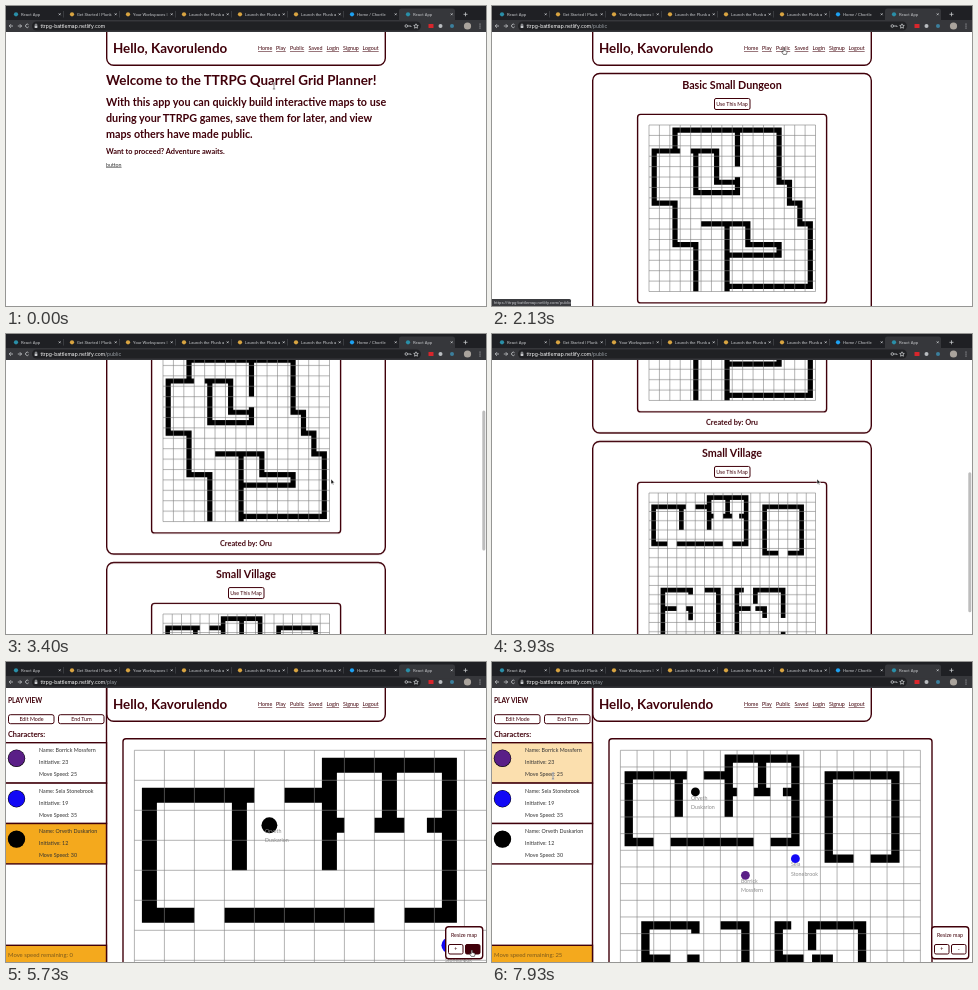
An HTML page for the animation above (8000 ms loop, 480x300 px).

```html
<!DOCTYPE html>
<html lang="en">
<head>
<meta charset="utf-8">
<title>Battle map</title>
<style>
@property --scroll { syntax: "<number>"; inherits: true; initial-value: 0; }
@property --cell { syntax: "<number>"; inherits: true; initial-value: 32.67; }
html, body { margin: 0; width: 100%; height: 100%; overflow: hidden; background: #fff; }
svg { display: block; width: 480px; height: 300px; font: 5.33px Lato, sans-serif; --ink: #40000a; }
text { fill: #333; white-space: pre; }
.ink { fill: var(--ink); }
.bold { fill: var(--ink); font-weight: 700; }
.h1 { font-size: 13.4px; }
.h2 { font-size: 10.75px; }
.h3 { font-size: 7.35px; }
.view { font-size: 6.6px; }
.speed { font-size: 5.9px; fill: #7d5a1c; }
.mid { text-anchor: middle; }
.light { fill: #fff; }
.link { text-decoration: underline; }
.label { fill: #8c8c8c; }
.box { fill: #fff; stroke: var(--ink); stroke-width: 1.4px; }
.thin { stroke-width: 1px; }
.wall { fill: none; stroke: #000; stroke-width: .5; }
.grid { fill: none; stroke: #808080; stroke-width: .6px; vector-effect: non-scaling-stroke; }
.ui { font-family: Roboto, sans-serif; font-size: 4.2px; fill: #c6c8cb; }
.url { font-family: Inter, sans-serif; font-size: 5px; fill: #fff; }
.dim { fill: #9aa0a6; }
.icon { fill: none; stroke: #c6c8cb; stroke-width: .8px; }
#public { transform: translateY(calc(var(--scroll) * -1px)); }
#thumb { transform: translateY(calc(var(--scroll) * .51px)); }
#board { width: calc(var(--cell) * 18px + 23px); height: calc(var(--cell) * 16px + 23px); }
#field { transform: scale(var(--cell)); }
.token { transform: translate(calc(var(--x) * var(--cell) * 1px), calc(var(--y) * var(--cell) * 1px)); }
.token circle { r: calc(var(--cell) * .265px); }
</style>
</head>
<body>
<svg id="stage" viewBox="0 0 480 300"></svg>
<script>
const LOOP = 8000, INK = '#40000a', ORANGE = '#f4a91d', PALE = '#fbdfae';

const text = (x, y, s, cls = '') => `<text x="${x}" y="${y}" class="${cls}">${s}</text>`;
const rect = (x, y, w, h, r = 0, attrs = 'class="box"') =>
  `<rect x="${x}" y="${y}" width="${w}" height="${h}" rx="${r}" ${attrs}/>`;
const dot = (x, y, r, color) => `<circle cx="${x}" cy="${y}" r="${r}" fill="${color}"/>`;
const icon = d => `<path d="${d}" class="icon"/>`;
const group = (id, body) => `<g id="${id}">${body}</g>`;
const shift = (x, y, body) => `<g transform="translate(${x} ${y})">${body}</g>`;

// Walls run through cell centres, in cell units.
const dungeon = {
  cols: 16, rows: 16,
  walls: 'M2.5 2H0V7H2V11H4V15.5M2 2V0H12V5H13V7H14V9H15V15H7M7 15.5V9M4.5 9H9V11H12V12H7' +
    'M3.5 2H6V5H8M8 4.5V6H4V2M8 0V3.5'
};
const village = {
  cols: 18, rows: 16,
  walls: 'M3.5 1H0V5H1.5M2.5 5H7.5M8.5 5H10V0H6V3.5M4.5 1H6M3 1V3.5M6 2H6.5M8 0V2M7.5 2H8.5M9.25 2H10' +
    'M13.5 6H12V1H16V6H14.5' +
    'M4.25 10H1V15H7V10H5.5M4 10V10.5M1 12H2.5M3.5 12H4.25M4 12V13.25' +
    'M9.75 10H9V15H14V14.5M10.75 10H14V13M11 10V11.5M9 12H10.5M11 12H12V13'
};

function drawMap({ cols, rows, walls }) {
  let lines = '';
  for (let i = 0; i <= cols; i++) lines += `M${i} 0V${rows}`;
  for (let j = 0; j <= rows; j++) lines += `M0 ${j}H${cols}`;
  return `<path class="wall" transform="translate(.5 .5)" d="${walls}"/><path class="grid" d="${lines}"/>`;
}

function header() {
  const links = { Home: 252, Play: 270, Public: 284, Saved: 302.5, Login: 320.5, Signup: 337, Logout: 356.5 };
  return rect(100.7, 10, 278.6, 49.3, 7) + text(107, 47, 'Hello, Kavorulendo', 'bold h1') +
    Object.entries(links).map(([name, x]) => text(x, 44, name, 'ink link')).join('');
}

function home() {
  return header() +
    text(100, 78.5, 'Welcome to the TTRPG Quarrel Grid Planner!', 'bold h1') +
    ['With this app you can quickly build interactive maps to use',
     'during your TTRPG games, save them for later, and view',
     'maps others have made public.'].map((s, i) => text(100, 99.7 + 16 * i, s, 'bold h2')).join('') +
    text(100, 148, 'Want to proceed? Adventure awaits.', 'bold h3') +
    text(100, 160.5, 'button', 'link');
}

function card(y, name, map, hoverId) {
  const cell = 166.5 / map.cols, h = cell * map.rows;
  const button = (attrs, cls) => rect(222.5, 25.5, 35.5, 11, 1.5, attrs) + text(240, 32.9, 'Use This Map', cls);
  return shift(0, y,
    rect(100.7, .5, 278.6, h + 84, 7) +
    text(240, 16.3, name, 'bold h2 mid') +
    button('class="box thin"', 'ink mid') +
    (hoverId ? group(hoverId, button('class="ink"', 'light mid')) : '') +
    rect(145.6, 41.4, 189, h + 22, 3) +
    `<g transform="translate(157 52) scale(${cell})">${drawMap(map)}</g>` +
    text(240, 52 + h + 24.6, 'Created by: Oru', 'bold h3 mid'));
}

const people = [
  { name: 'Borrick Mossfern', init: 23, speed: 25, color: '#5a1f87', x: 7.5, y: 7.5 },
  { name: 'Sela Stonebrook', init: 19, speed: 35, color: '#1208f5', x: 10.5, y: 6.5 },
  { name: 'Orveth Duskarion', init: 12, speed: 30, color: '#000', x: 4.5, y: 2.5 }
];

function sidebar() {
  const rows = people.map((p, i) => shift(0, 80.7 + 40.4 * i,
    rect(-2, 0, 102.5, 40.4, 0, `id="row${i}" class="box"`) +
    dot(10.5, 15.6, 8.7, '#000') + dot(10.5, 15.6, 8.2, p.color) +
    text(33, 9.8, 'Name: ' + p.name) + text(33, 21.8, 'Initiative: ' + p.init) +
    text(33, 33.8, 'Move Speed: ' + p.speed))).join('');
  const button = (x, s) => rect(x, 52.7, 45.5, 9, 2, 'class="box thin"') + text(x + 23, 59.2, s, 'ink mid');
  const left = n => text(2, 294.6, 'Move speed remaining: ' + n, 'speed');
  return rect(-2, 10, 102.5, 300) +
    text(2, 41, 'PLAY VIEW', 'bold view') +
    button(2.5, 'Edit Mode') + button(52.5, 'End Turn') +
    text(2, 75.2, 'Characters:', 'bold h3') + rows +
    rect(-2, 283.3, 102.5, 30, 0, `fill="${ORANGE}" stroke="${INK}" stroke-width="1.4"`) +
    group('spent', left(0)) + group('fresh', left(25));
}

function play() {
  const tokens = people.map(p => {
    const [first, last] = p.name.split(' ');
    return `<g class="token" style="--x:${p.x};--y:${p.y}"><circle fill="${p.color}"/>` +
      text(-4.5, 7.8, first, 'label') + text(-4.5, 17.2, last, 'label') + '</g>';
  }).join('');
  const battle = '<rect id="board" class="box" x="117" y="76.7" rx="3"/>' +
    shift(128.4, 88.3, group('field', drawMap(village)) + tokens);
  return group('battle', battle) + header() + sidebar() +
    rect(439.7, 264.7, 37, 32, 3) + text(458, 275.2, 'Resize map', 'ink mid') +
    rect(442.5, 282.5, 14.5, 9.5, 1.5, 'class="box thin"') + text(449.8, 289, '+', 'ink mid') +
    rect(459.5, 282.5, 14.5, 9.5, 1.5, 'id="minus" class="box thin"') + text(466.8, 289, '-', 'ink mid');
}

function chrome() {
  const tabs = ['React App', 'Get Started | Plunk', 'Your Workspaces |', 'Launch the Plunk a',
    'Launch the Plunk a', 'Launch the Plunk a', 'Home / Chortle', 'React App'];
  const tints = ['#2a8fa8', '#d9a441', '#d9a441', '#d9a441', '#d9a441', '#d9a441', '#1da1f2', '#2a8fa8'];
  const fill = c => `fill="${c}"`;
  const host = 'ttrpg-battlemap.netlify.com';
  const address = (id, path) => group(id, text(34.5, 21.9, `${host}<tspan class="dim">${path}</tspan>`, 'url'));
  return rect(0, 0, 480, 26, 0, fill('#36373b')) + rect(0, 0, 480, 14, 0, fill('#1f2024')) +
    rect(393, 2.5, 56, 14, 2.5, fill('#36373b')) +
    tabs.map((s, i) => shift(56 * i, 0,
      dot(10, 8.3, 2.1, tints[i]) + text(15, 9.8, s, 'ui') + icon('M52.8 7.4l1.8 1.8m0-1.8l-1.8 1.8') +
      (i < 6 ? rect(57, 5, .5, 6.5, 0, fill('#55575b')) : ''))).join('') +
    icon('M457.5 8.3h4M459.5 6.3v4') +
    rect(26, 15.5, 389, 9, 4.5, fill('#202124')) +
    icon('M7 20H3.2M5 18.2L3.2 20L5 21.8M11.8 20h3.8M13.8 18.2l1.8 1.8l-1.8 1.8M22.5 18.7a1.7 1.7 0 1 0 .2 2') +
    rect(28.6, 19.5, 2.8, 2.4, .3, fill('#c6c8cb')) + icon('M29.2 19.5v-.7a.8.8 0 0 1 1.6 0v.7') +
    address('urlHome', '') + address('urlPublic', '/public') + address('urlPlay', '/play') +
    icon('M402 20h3v1M399 20a1.2 1.2 0 1 0 2.6 0a1.2 1.2 0 1 0-2.6 0') +
    icon('M410 17.8l.7 1.5l1.6.2l-1.2 1.1l.3 1.6l-1.4-.8l-1.4.8l.3-1.6l-1.2-1.1l1.6-.2z') +
    rect(422.5, 18, 5, 4, .6, fill('#d8262c')) + dot(434.5, 20, 2, '#b9bcc0') + dot(446, 20, 2, '#3b7f9c') +
    dot(461.5, 20, 3.6, '#aaa49d') +
    [18, 20, 22].map(y => dot(474, y, .55, '#c6c8cb')).join('');
}

const status = (id, page, w) => group(id,
  rect(-2, 293, w, 9, 1.5, 'fill="#3a3b3f"') + text(2, 298, 'https://ttrpg-battlemap.netlify.com/' + page, 'ui'));

const pointer = () => group('cursor',
  '<path id="arrow" d="M0 -2V3.2L1.2 2.1L2 3.8L2.8 3.4L2 1.8H3.6Z" fill="#111" stroke="#fff" stroke-width=".5"/>' +
  '<path id="hand" d="M-.8 -2.6Q0 -3.3 .5 -2.6V-.4L2.6 .2Q3.2 .5 3 1.4L2.4 3.4H-.7L-2.4 .9Q-2.3 0 -.8 .8Z" ' +
    'fill="#fff" stroke="#222" stroke-width=".6"/>' +
  '<g id="beam" fill="none"><path d="M0 -3V3M-1.2 -3H1.2M-1.2 3H1.2" stroke="#fff" stroke-width="1.3"/>' +
    '<path d="M0 -3V3M-1.2 -3H1.2M-1.2 3H1.2" stroke="#444" stroke-width=".6"/></g>');

const stage = document.getElementById('stage');
stage.innerHTML =
  group('home', home()) +
  group('public', card(67, 'Basic Small Dungeon', dungeon) + card(326, 'Small Village', village, 'use') + header()) +
  group('play', play()) +
  group('bar', rect(476.3, 26.5, 3, 140, 1.5, 'id="thumb" fill="#bdbdbd"')) +
  status('linkPublic', 'public', 81) + status('linkPlay', 'play', 78) +
  chrome() + pointer();

// Times are in ms; each track becomes one CSS keyframes rule.
let css = '';
function track(id, prop, keys, easing = 'step-end') {
  const all = [...keys, [LOOP, keys.at(-1)[1]]];
  const body = all.map(([t, v]) => `${t / LOOP * 100}%{${prop}:${v}}`).join('');
  css += `@keyframes ${id}{${body}}#${id}{animation:${id} ${LOOP}ms ${easing} infinite}`;
}
function show(id, ...spans) {
  const keys = spans.flatMap(([a, b]) => [[a, 1], [b, 0]]).filter(([t]) => t < LOOP);
  track(id, 'opacity', keys[0][0] ? [[0, 0], ...keys] : keys);
}

show('home', [0, 2130]);
show('public', [2130, 5000]);
show('play', [5000, LOOP]);
show('bar', [2400, 5000]);
show('urlHome', [0, 2000]);
show('urlPublic', [2000, 4800]);
show('urlPlay', [4800, LOOP]);
show('linkPublic', [1530, 2470]);
show('linkPlay', [4600, 5270]);
show('use', [4600, 5000]);
show('spent', [5000, 7800]);
show('fresh', [7800, LOOP]);
show('beam', [0, 260], [4600, 5200], [7660, LOOP]);
show('hand', [1470, 2940], [5530, 7000]);
show('arrow', [260, 1470], [2940, 4600], [5200, 5530], [7000, 7660]);

track('minus', 'fill', [[0, '#fff'], [5530, INK], [7000, '#fff']]);
track('row0', 'fill', [[0, '#fff'], [7660, PALE]]);
track('row2', 'fill', [[0, ORANGE], [7800, '#fff']]);

track('stage', '--scroll', [[0, 0], [2500, 0], [2870, 60], [3000, 68], [3270, 68], [3930, 219],
  [4070, 232], [4130, 232], [4400, 249.5]], 'linear');

// The map loses a fixed amount of cell size on every click.
const sizes = [[0, 98 / 3]];
for (let i = 1; i <= 6; i++) sizes.push([5530 + 200 * i, (98 - 8 * i) / 3]);
track('battle', '--cell', sizes);

const path = [[0, 268, 80], [130, 268, 80], [330, 296, 204], [560, 296, 204], [1400, 297, 49], [1530, 292, 45],
  [2400, 292, 45], [2600, 325, 147], [4130, 325, 147], [4800, 243, 107], [5170, 243, 107], [5530, 466, 291],
  [6950, 466, 291], [7130, 152, 179], [7300, 152, 179], [7900, 61, 114]];
track('cursor', 'transform', path.map(([t, x, y]) => [t, `translate(${x}px,${y}px)`]), 'linear');

document.head.appendChild(document.createElement('style')).textContent = css;
</script>
</body>
</html>
```
